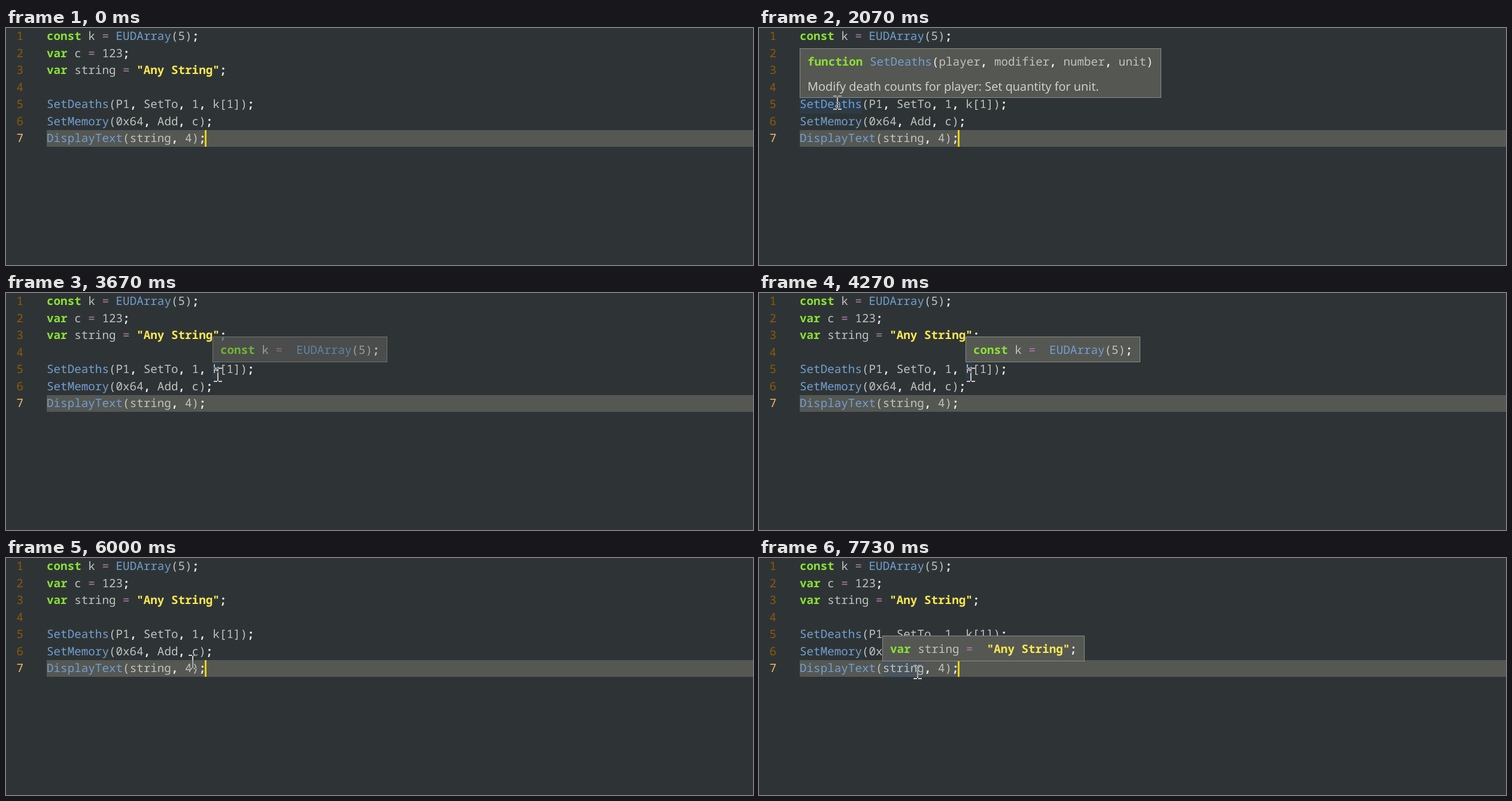
An HTML page that plays this animation: 1248 by 397 pixels, repeating every 8 s.

```html
<!DOCTYPE html>
<html lang="en">
<head>
<meta charset="utf-8">
<title>Code hover hints</title>
<style>
  html, body { margin: 0; width: 100%; height: 100%; overflow: hidden; background: #2e3436; }
  #stage { position: relative; width: 1248px; height: 397px; overflow: hidden; background: #2e3436; isolation: isolate; }
  #stage > * { position: absolute; box-sizing: border-box; }
  pre { margin: 0; font: 500 19.25px/28.5px "Noto Sans Mono", "DejaVu Sans Mono", monospace;
        color: #c0c2be; text-rendering: geometricPrecision; white-space: pre; }
  #numbers, #code { top: -.6px; }
  #numbers { left: 17.5px; color: #8f5902; }
  #numbers b { color: #f8b863; font-weight: 500; }
  #code { left: 68px; }
  #line { left: 68px; top: 171px; right: 0; height: 28px; background: #555753; }
  #caret { left: 332px; top: 171px; width: 3px; height: 28px; background: #edd400; }
  .word { height: 28.5px; background: rgba(38, 79, 120, .25); }
  .hint { padding: 6.5px 12px 6px; border: 1px solid #8a8c88; background: #555753; white-space: nowrap; }
  .hint p { margin: 15.5px 0 0; font: 19.95px/24.5px "Open Sans", "Noto Sans", sans-serif;
            color: #d3d7cf; text-rendering: geometricPrecision; }
  .key { color: #8ae234; font-weight: 600; }
  .fn { color: #729fcf; }
  .str { color: #fce94f; font-weight: 600; }
  .op { color: #ad7fa8; }
  .punct { color: #eeeeec; font-weight: 700; }
  .sign .paren { color: #eeeeec; }
  #mouse { left: 0; top: 0; width: 14px; height: 24px; mix-blend-mode: difference; }
</style>
</head>
<body>
<div id="stage">
  <div id="line"></div>
  <pre id="numbers">1
2
3
4
5
6
<b>7</b></pre>
  <pre id="code">const k = EUDArray(5);
var c = 123;
var string = "Any String";

SetDeaths(P1, SetTo, 1, k[1]);
SetMemory(0x64, Add, c);
DisplayText(string, 4);</pre>
  <div id="caret"></div>
  <svg id="mouse" viewBox="0 0 14 24"><path fill="#fff" d="M0 0h6v2h-6zM8 0h6v2h-6zM6 2h2v20h-2zM0 22h6v2h-6zM8 22h6v2h-6z"/></svg>
</div>
<script>
const LOOP = 8000, FPS = 15, CHAR = 11.55, ROW = 28.5, LEFT = 68;
const BLINK = 500, BLINK_SHIFT = 270, FADE = 150;
const $ = id => document.getElementById(id);
const stage = $('stage'), code = $('code'), mouse = $('mouse'), caret = $('caret');

// The pointer appears at the first place, then glides to each next one
const entry = { x: 435, y: 361 };
const moves = [
  { from: 600, to: 800, x: 414, y: 161 },
  { from: 1070, to: 1400, x: 193, y: 121 },
  { from: 1400, to: 1670, x: 131, y: 125 },
  { from: 2530, to: 3000, x: 346, y: 144 },
  { from: 3130, to: 3270, x: 354, y: 137 },
  { from: 4530, to: 5000, x: 320, y: 160 },
  { from: 5870, to: 6040, x: 310, y: 178 },
  { from: 6930, to: 7130, x: 265, y: 191 }
];

const hints = [
  { row: 4, word: 'SetDeaths', from: 1930, to: 2730,
    code: 'function SetDeaths(player, modifier, number, unit)',
    doc: 'Modify death counts for player: Set quantity for unit.' },
  { row: 4, word: 'k', from: 3600, to: 4670, code: 'const k =  EUDArray(5);' },
  { row: 5, word: 'c', from: 5330, to: 5930, code: 'var c =  123;' },
  { row: 6, word: 'string', from: 7400, to: LOOP, code: 'var string =  "Any String";' }
];

function colour(text) {
  const tokens = /(?<key>\b(?:const|var|function)\b)|(?<fn>EUDArray|SetDeaths|SetMemory|DisplayText)|(?<str>"[^"]*")|(?<op>=)|(?<punct>[,;])|(?<paren>[()])/g;
  return text.replace(tokens, (token, ...rest) => {
    const groups = rest.at(-1);
    const kind = Object.keys(groups).find(name => groups[name]);
    return `<span class="${kind}">${token}</span>`;
  });
}

function add(className, css, before) {
  const el = document.createElement('div');
  el.className = className;
  el.style.cssText = css;
  return stage.insertBefore(el, before);
}

const lines = code.textContent.split('\n');
code.innerHTML = colour(code.textContent);

for (const h of hints) {
  const x = LEFT + lines[h.row].indexOf(h.word) * CHAR, y = h.row * ROW;
  const top = Math.round(y - (h.doc ? 80 : 41));
  h.mark = add('word', `left:${x}px;top:${y}px;width:${h.word.length * CHAR}px`, code);
  h.box = add(h.doc ? 'hint sign' : 'hint', `left:${Math.round(x - .3)}px;top:${top}px`, mouse);
  h.box.innerHTML = `<pre>${colour(h.code)}</pre>` + (h.doc ? `<p>${h.doc}</p>` : '');
}

function pointerAt(t) {
  let { x, y } = entry;
  for (const m of moves) {
    const k = Math.max(0, Math.min(1, (t - m.from) / (m.to - m.from)));
    x += (m.x - x) * k;
    y += (m.y - y) * k;
  }
  return [Math.round(x), Math.round(y)];
}

function draw(now) {
  // The picture steps at a fixed rate, on times rounded to 10 ms
  const step = Math.floor((now % LOOP + 4) * FPS / 1000);
  const t = Math.round(step * 100 / FPS) * 10 % LOOP;

  caret.style.opacity = Math.floor((t + BLINK_SHIFT) / BLINK) % 2 ? 0 : 1;

  const [x, y] = pointerAt(t);
  mouse.style.display = t < moves[0].from ? 'none' : '';
  mouse.style.transform = `translate(${x - 7}px, ${y - 12}px)`;

  for (const h of hints) {
    const shown = t >= h.from && t < h.to;
    h.mark.style.opacity = shown ? 1 : 0;
    h.box.style.opacity = shown ? Math.min(1, (t - h.from + 40) / FADE) : 0;
  }
  requestAnimationFrame(draw);
}
requestAnimationFrame(draw);
</script>
</body>
</html>
```
